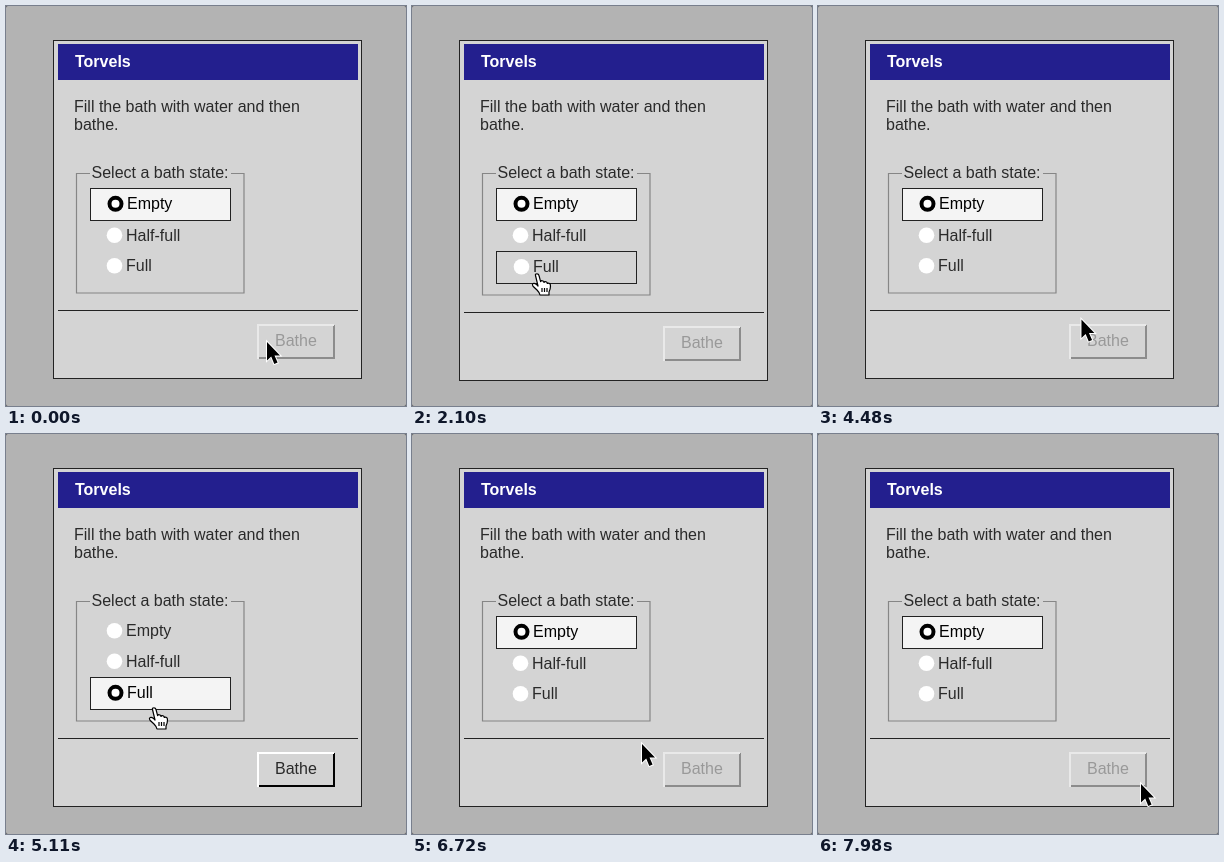
These frames come from a looping animation (400x400 px, 8000 ms). An HTML page:

```html
<!DOCTYPE html>
<html lang="en">
<head>
<meta charset="utf-8">
<title>Bath dialog</title>
<style>
  html, body { margin: 0; width: 100%; height: 100%; overflow: hidden; background: #555; }
  svg { display: block; width: 100vw; height: 100vh; background: #b3b3b3; border-radius: 2px; }
  text { font: 16px "Liberation Sans", Arial, sans-serif; fill: #2a2a2a; white-space: pre; }
  .title { font-weight: bold; fill: #fff; }
  .line { fill: none; stroke: #222; }
  .row rect { fill: none; stroke: none; }
  .row circle { fill: #fff; }
  .boxed rect { stroke: #222; }
  .picked rect { fill: #f4f4f4; }
  .picked text { fill: #000; }
  .picked circle { stroke: #000; stroke-width: 4; }
  .lit, .shade { fill: none; stroke-width: 2; }
  .lit { stroke: #e9e9e9; }
  .shade { stroke: #8c8c8c; }
  .btn text { fill: #999; }
  .on .lit { stroke: #fff; }
  .on .shade { stroke: #000; }
  .on text { fill: #2a2a2a; }
</style>
</head>
<body>
<svg viewBox="0 0 400 400">
  <rect id="dialog" class="line" x="47.5" y="34.5" width="308" height="338" style="fill:#d4d4d4"/>
  <rect x="52" y="38" width="300" height="36" fill="#231f8e"/>
  <text class="title" x="69" y="61">Torvels</text>
  <text x="68" y="106">Fill the bath with water and then</text>
  <text x="68" y="124">bathe.</text>
  <path id="group" fill="none" stroke="#868686" stroke-width="1.2"/>
  <text x="85.5" y="172">Select a bath state:</text>
  <g id="rows"></g>
  <g id="foot">
    <path class="line" d="M52 304.5H352"/>
    <g id="btn" class="btn">
      <path class="shade" d="M252 352H328V319"/>
      <path class="lit" d="M252 353V319H328"/>
      <text x="269" y="340">Bathe</text>
    </g>
  </g>
  <path id="arrow" d="M0 0V18.5L4.2 14.6L7.3 22L10.6 20.6L7.5 13.5H13Z"
        fill="#000" stroke="#fff" stroke-width="2" paint-order="stroke"/>
  <g id="hand" stroke="#000" stroke-width="1.2" stroke-linejoin="round">
    <path fill="#fff" d="M3.5 2.5Q3 .8 5 .8Q6.6 .8 7 2.5L8.6 8.6Q9 7.4 10.6 7.8Q12 8 12 9.4Q12.6 8.3 14 8.8Q15.2 9.2 15.3 10.4Q16.5 9.8 17.6 10.6Q18.5 11.2 18.5 13Q18.5 16 17 19V22H8Q7.5 19.5 5 17L1 13.2Q-.2 11.6 1 10.6Q2.4 9.8 4.2 11.2L6 13Z"/>
    <path fill="none" d="M10 15v4M12.5 15v4M15 15v4"/>
  </g>
</svg>
<script>
const LOOP = 8000, STEP = 70;
const ROW = 30.5, TOP = 182;
const CLICKS = [2380, 5110, 7280];

// Pointer stops: time, x, y
const PATH = [
  [0, 260, 335], [700, 260, 335], [1540, 125, 268], [2380, 125, 268],
  [2590, 225, 300], [2940, 294, 323], [4270, 294, 323], [4970, 148, 274],
  [5110, 148, 274], [5320, 245, 321], [5600, 308, 361], [5880, 300, 340],
  [6370, 300, 340], [6720, 229, 309], [7210, 146, 270], [7280, 146, 270],
  [7490, 252, 322], [7700, 318, 357], [7980, 322, 349], [8000, 322, 349]
];

const el = id => document.getElementById(id);

const rows = ["Empty", "Half-full", "Full"].map(label => {
  const g = document.createElementNS("http://www.w3.org/2000/svg", "g");
  g.innerHTML = `<rect x="84.5" y=".5" width="140" height="32"/>
    <circle/><text>${label}</text>`;
  el("rows").append(g);
  const [box, dot, text] = g.children;
  return { g, box, dot, text };
});

// Slope at a stop; flat at rests and turning points
function slope(i, k) {
  const a = PATH[i - 1], b = PATH[i], c = PATH[i + 1];
  if (!a || !c || (b[k] - a[k]) * (c[k] - b[k]) <= 0) return 0;
  return (c[k] - a[k]) / (c[0] - a[0]);
}

function pointer(t) {
  let i = 0;
  while (i < PATH.length - 2 && t >= PATH[i + 1][0]) i++;
  const a = PATH[i], b = PATH[i + 1], d = b[0] - a[0];
  const u = (t - a[0]) / d, s = u * u * (3 - 2 * u);
  return [1, 2].map(k =>
    a[k] + (b[k] - a[k]) * s +
    d * u * (1 - u) * ((1 - u) * slope(i, k) - u * slope(i + 1, k)));
}

function setAttrs(node, attrs) {
  for (const k in attrs) node.setAttribute(k, attrs[k]);
}

function draw(t) {
  const [x, y] = pointer(t);
  const full = CLICKS.some(c => t >= c && t < c + 720) && x < 253;
  const over = x > 84 && x < 225 && y > 244 && y < 277.5;
  const picked = full ? 2 : 0;

  let top = TOP;
  rows.forEach((r, i) => {
    const sel = i === picked, boxed = sel || (i === 2 && over), b = boxed ? 1 : 0;
    r.g.setAttribute("class", "row" + (boxed ? " boxed" : "") + (sel ? " picked" : ""));
    r.box.setAttribute("y", Math.round(top) + .5);
    setAttrs(r.dot, { cx: 108.5 + b, cy: top + 14.8 + b, r: sel ? 6 : 7.8 });
    setAttrs(r.text, { x: 120 + b, y: Math.round(top + 20.2 + b) });
    top += ROW + 2 * b;
  });

  const grow = over && !full ? 2 : 0;
  el("dialog").setAttribute("height", 338 + grow);
  el("group").setAttribute("d", `M84 167.5H70.5V${287 + grow}H238V167.5H225`);
  el("foot").setAttribute("transform", `translate(0 ${grow})`);
  el("btn").setAttribute("class", full ? "btn on" : "btn");

  setAttrs(el("arrow"), { transform: `translate(${x + 1} ${y + 1})`, visibility: over ? "hidden" : "visible" });
  setAttrs(el("hand"), { transform: `translate(${x - 5} ${y - 1})`, visibility: over ? "visible" : "hidden" });
}

function tick() {
  const t = performance.now() % LOOP;
  draw(Math.floor(t / STEP) * STEP);
  requestAnimationFrame(tick);
}
tick();
</script>
</body>
</html>
```
